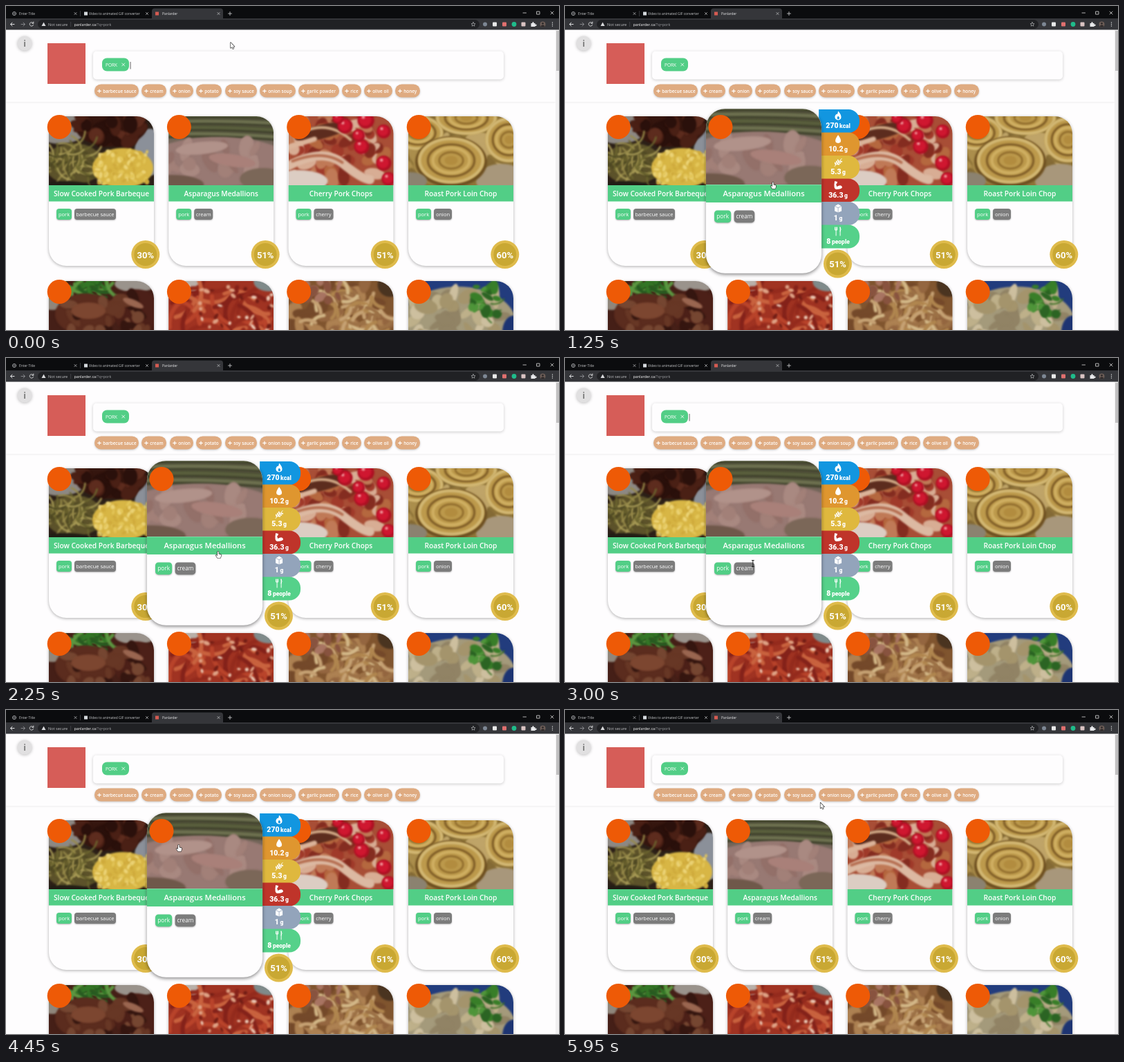
Animation, 800 px wide and 470 px high, one loop 6 s. Source, as an HTML page with a canvas:

```html
<!DOCTYPE html>
<html lang="en">
<head>
<meta charset="utf-8">
<title>Recipe search</title>
<style>
html, body { margin: 0; width: 100%; height: 100%; overflow: hidden; background: #fefdfe; }
canvas { display: block; }
</style>
</head>
<body>
<canvas id="stage" width="800" height="470"></canvas>
<script>
const LOOP = 6000, SANS = '"Open Sans", sans-serif', ROBOTO = 'Roboto, sans-serif';
const GREEN = '#52ce86', ORANGE = '#ee5a06';
const main = document.getElementById('stage').getContext('2d');
let g = main;

// ---- drawing helpers
function box(x, y, w, h, color, r = 0) {
  g.fillStyle = color;
  g.beginPath();
  g.roundRect(x, y, w, h, r);
  g.fill();
}
function oval(x, y, rx, ry, color, turn = 0) {
  g.fillStyle = color;
  g.beginPath();
  g.ellipse(x, y, rx, ry, turn, 0, 7);
  g.fill();
}
const dot = (x, y, r, color) => oval(x, y, r, r, color);
function ring(x, y, rx, ry, color, width) {
  g.strokeStyle = color;
  g.lineWidth = width;
  g.beginPath();
  g.ellipse(x, y, rx, ry, 0, 0, 7);
  g.stroke();
}
function stroke(d, color, width) {
  g.strokeStyle = color;
  g.lineWidth = width;
  g.lineCap = 'round';
  g.stroke(new Path2D(d));
}
function fill(d, color) {
  g.fillStyle = color;
  g.fill(new Path2D(d));
}
function text(s, x, y, size, color, weight = 400, align = 'left', family = SANS) {
  g.font = `${weight} ${size}px ${family}`;
  g.textAlign = align;
  g.fillStyle = color;
  g.fillText(s, x, y);
}
function shadowed(alpha, blur, dy, draw) {
  g.save();
  g.shadowColor = `rgba(0,0,0,${alpha})`;
  g.shadowBlur = blur;
  g.shadowOffsetY = dy;
  draw();
  g.restore();
}
function at(x, y, draw) {
  g.save();
  g.translate(x, y);
  draw();
  g.restore();
}

// ---- dish pictures: soft shapes, painted once
let seed = 1;
const rnd = () => (seed = seed * 16807 % 2147483647) / 2147483647;
const between = (a, b) => a + (b - a) * rnd();

function blobs(n, x, y, w, h, size, ...colors) {
  for (let i = 0; i < n; i++)
    oval(x + rnd() * w, y + rnd() * h, size * between(.6, 1.3), size * between(.35, .8),
      colors[i % colors.length], rnd() * 3);
}
function strands(n, x, y, w, h, length, width, ...colors) {
  for (let i = 0; i < n; i++) {
    const a = x + rnd() * w, b = y + rnd() * h, turn = rnd() * 6.3;
    const dx = length * Math.cos(turn), dy = length * Math.sin(turn);
    stroke(`M${a} ${b}q${dx / 2 - dy * .3} ${dy / 2 + dx * .3} ${dx} ${dy}`, colors[i % colors.length], width);
  }
}
function cherry(x, y, r) {
  dot(x, y, r, '#b01024');
  dot(x - 1, y - 1, r * .75, '#cf1730');
  dot(x - r * .3, y - r * .4, r * .2, '#f4a3a5');
}
function onion(x, y, rx, ry) {
  oval(x, y, rx, ry, '#bd9a4c');
  ring(x, y, rx * .95, ry * .95, '#d3b976', 4);
  ring(x, y, rx * .7, ry * .7, '#7c5a25', 3);
  ring(x, y, rx * .55, ry * .55, '#d0b063', 4);
  ring(x, y, rx * .36, ry * .36, '#8b6729', 2.5);
  oval(x, y, rx * .2, ry * .2, '#b28c3f');
}
function picture(start, base, paint) {
  const c = document.createElement('canvas');
  c.width = 304;
  c.height = 200;
  g = c.getContext('2d');
  g.scale(2, 2);
  g.filter = 'blur(2.5px)';
  seed = start;
  box(-9, -9, 170, 118, base);
  paint();
  g = main;
  return c;
}

const pictures = [
  picture(11, '#2c2018', () => {
    oval(16, 16, 40, 24, '#8d8883');
    oval(146, 52, 22, 34, '#8b9099');
    oval(90, 14, 52, 30, '#35160f');
    blobs(26, 45, 0, 90, 36, 13, '#4a2015', '#2a100b', '#5d2c1e');
    oval(36, 69, 42, 30, '#5c522a');
    strands(50, 0, 42, 62, 42, 25, 2.5, '#978a49', '#6c662f', '#4c4722', '#aa9d58');
    oval(107, 75, 44, 29, '#d8b645');
    blobs(80, 66, 50, 78, 48, 4, '#e4c75a', '#cfaa3c', '#ecd478');
    oval(25, 101, 34, 7, '#211d15');
  }),
  picture(22, '#74665a', () => {
    for (let i = 0; i < 4; i++) {
      stroke(`M-5 ${i * 9}Q70 ${i * 9 - 3} 157 ${i * 10 + 1}`, '#42442e', 10);
      stroke(`M-5 ${i * 9 - 1}Q70 ${i * 9 - 4} 157 ${i * 10}`, i % 2 ? '#6e7150' : '#5a5f3d', 5);
    }
    oval(72, 66, 105, 36, '#987973');
    blobs(16, 0, 44, 138, 36, 14, '#a28078', '#a98981', '#937069');
    oval(48, 46, 38, 9, '#b1928a', -.1);
    oval(92, 64, 34, 9, '#a98079', .15);
    oval(5, 99, 46, 14, '#6f584a');
    oval(137, 91, 34, 16, '#7b6758');
  }),
  picture(33, '#a84e36', () => {
    blobs(60, 0, 0, 150, 95, 12, '#c07a57', '#842c20', '#d8ad94', '#a03a2a', '#b5683f');
    oval(15, 94, 42, 16, '#dccdc3');
    oval(50, 22, 42, 10, '#5c2c1e', -.25);
    stroke('M0 72Q50 45 78 68T118 92', '#dcb9a2', 13);
    stroke('M6 65Q50 48 78 67', '#b56d50', 4);
    stroke('M25 21Q60 7 90 34', '#d2aa87', 4);
    stroke('M0 45L38 33', '#dbb49a', 7);
    [[82, 14, 11], [112, 6, 12], [106, 44, 11], [138, 68, 11], [145, 91, 10], [102, 28, 9], [72, 3, 8], [138, 22, 10]]
      .forEach(c => cherry(...c));
  }),
  picture(44, '#8f7439', () => {
    blobs(24, 0, 0, 152, 100, 20, '#ab8e4c', '#846a35', '#bfa468');
    onion(14, 24, 36, 24);
    onion(84, 2, 44, 24);
    onion(146, 34, 34, 32);
    oval(135, 93, 37, 24, '#a8977b');
    oval(62, 66, 52, 37, '#6f5122');
    onion(62, 64, 48, 33);
    oval(3, 94, 24, 13, '#8b8270');
  }),
  picture(55, '#451f17', () => {
    oval(6, 24, 30, 18, '#8f867b');
    oval(125, 4, 30, 12, '#9a938c');
    strands(22, 24, 0, 60, 14, 28, 5, '#347727', '#5c9741', '#285b21');
    oval(54, 48, 45, 30, '#5b2c1e');
    oval(127, 44, 34, 32, '#4c2018');
    blobs(28, 15, 24, 130, 58, 12, '#673725', '#351610', '#754631');
    oval(57, 43, 25, 12, '#7c4630');
    oval(122, 32, 16, 5, '#9a6650', .4);
  }),
  picture(66, '#a03322', () => {
    oval(1, 5, 45, 18, '#b9b0a9');
    strands(36, 10, 8, 135, 65, 44, 6, '#c9633f', '#84221a', '#b9442b', '#942b1d');
    blobs(34, 25, 8, 125, 65, 4, '#dfa386', '#ecccb8', '#701d15');
    oval(145, 1, 22, 14, '#7f8a8a');
  }),
  picture(77, '#80552f', () => {
    blobs(45, 0, 0, 152, 100, 16, '#946640', '#ad8152', '#74492a');
    strands(50, 35, 14, 100, 65, 22, 5, '#c6a274', '#b0864f', '#d3b888', '#9c7146');
    blobs(14, 0, 0, 80, 28, 9, '#a87462', '#88533f');
    oval(147, 5, 18, 18, '#4a3420');
  }),
  picture(88, '#223c7d', () => {
    oval(72, 62, 84, 54, '#a49a7b');
    blobs(36, 6, 18, 130, 70, 14, '#beb08a', '#918365', '#cdbf9f', '#a4946c');
    strands(8, 90, 26, 30, 20, 20, 2, '#3a7125');
    blobs(18, 88, 6, 44, 42, 8, '#387e28', '#4f953a', '#2b6423');
    oval(152, 74, 16, 24, '#1d3472');
  })
];

// ---- cards
const columns = [62, 235.2, 408.5, 582];
const dishes = [
  ['Slow Cooked Pork Barbeque', 'barbecue sauce', 60, '30%'],
  ['Asparagus Medallions', 'cream', 27, '51%'],
  ['Cherry Pork Chops', 'cherry', 28, '51%'],
  ['Roast Pork Loin Chop', 'onion', 26, '60%']
];

function tag(s, x, w, color) {
  shadowed(.3, 2, 1, () => box(x, 134, w, 16, color, 4));
  text(s, x + w / 2, 144.6, 7.5, '#fff', 400, 'center');
}
function cardBody(i, lift = 0) {
  const [name, extra, width] = dishes[i % 4];
  shadowed(.32 + lift * .13, 4 + lift, 1 + lift, () => box(0, 0, 152, 217, '#fefdfe', 25));
  g.save();
  g.beginPath();
  g.roundRect(0, 0, 152, 217, 25);
  g.clip();
  g.drawImage(pictures[i], 0, 0, 152, 100);
  box(0, 100, 152, 23.5, GREEN);
  g.restore();
  text(name, 76, 115.5, 10.2, '#fff', 600, 'center');
  tag('pork', 11, 22, GREEN);
  tag(extra, 37, width, '#7c7c7c');
}
function badge(x, y, label) {
  dot(x, y, 20.5, '#dfbb4b');
  dot(x, y, 16.5, '#c9a833');
  text(label, x, y + 5, 13, '#fff', 700, 'center', ROBOTO);
}
function card(i) {
  const x = columns[i % 4], y = i < 4 ? 160 : 399;
  at(x, y, () => cardBody(i));
  dot(x + 15.2, y + 15.5, 17.5, ORANGE);
  if (i < 4) badge(x + 139.8, 360.5, dishes[i][3]);
}

// ---- nutrition panel
const icons = [
  () => { fill('M0-7Q6-1 4 4Q0 8-4 4Q-6 0-2-3Q-1-1 0-7Z', '#fff'); fill('M0 0Q4 4 0 5Q-3 4 0 0Z', '#1296e0'); },
  () => fill('M0-6Q8 5 0 6Q-8 5 0-6Z', '#fff'),
  () => {
    stroke('M-5 6L5-5', '#fff', 1);
    for (let k = -2; k < 4; k += 2) {
      oval(k - 2, -k, 2.2, .9, '#fff', 1.3);
      oval(k + 2, 1 - k, 2.2, .9, '#fff', .2);
    }
  },
  () => fill('M-5-6L-1-5L-2-2L-3-2L-2 2Q5-2 6 3Q5 6-3 6Q-7 5-5-6Z', '#fff'),
  () => { fill('M0-6L5-3V4L0 6L-5 4V-3Z', '#fff'); stroke('M-5-3L0-1L5-3M0-1V6', '#93a4bb', .8); },
  () => stroke('M-3-6V6M-4.5-6V-2H-1.5V-6M3-6V6M3-6Q5-3 3 0', '#fff', 1)
];
const facts = [
  ['#1296e0', '270', 'kcal'], ['#df962f', '10.2', 'g'], ['#dfb83e', '5.3', 'g'],
  ['#bf342a', '36.3', 'g'], ['#93a4bb', '1', 'g'], ['#55d18a', '8', 'people']
];
function panel(x) {
  facts.forEach(([color, value, unit], i) => at(x, 150 + i * 33.5, () => {
    box(-4, 0, 59, 34, color, [0, 16, 16, 0]);
    at(24, 9.5, icons[i]);
    g.font = `900 10.5px ${ROBOTO}`;
    const a = g.measureText(value).width + 1.5;
    g.font = `900 8.5px ${ROBOTO}`;
    const left = 24 - (a + g.measureText(unit).width) / 2;
    text(value, left, 27, 10.5, '#fff', 900, 'left', ROBOTO);
    text(unit, left + a, 27, 8.5, '#fff', 900, 'left', ROBOTO);
  }));
}
function liftedCard(p) {
  const cx = 311.2 - 23.7 * p, s = 1 + .1 * p;
  const out = Math.max(0, (p - .4) / .6);
  if (out) panel(cx + 76 * s - 55 * (1 - out));
  at(cx, 268.5, () => {
    g.scale(s, s);
    g.translate(-76, -108.5);
    cardBody(1, p);
  });
  dot(250.4 - 25.4 * p, 175.5, 17.5, ORANGE);
  badge(375.2 + 19.3 * p, 360.5 + 13.5 * p, '51%');
}

// ---- browser window
function cross(x, y, r, color, width = .8) {
  stroke(`M${x - r} ${y - r}l${2 * r} ${2 * r}m0 ${-2 * r}l${-2 * r} ${2 * r}`, color, width);
}
function browser() {
  box(0, 0, 800, 18, '#0b0c0e');
  box(0, 18, 800, 16.4, '#35363a');
  box(211, 3.5, 103, 16, '#35363a', [4, 4, 0, 0]);
  ring(12, 11, 2.6, 2.6, '#9b9da0', .9);
  stroke('M9.5 11H14.5M12 8.5V13.5', '#9b9da0', .6);
  text('Enter Title', 19, 13, 4.9, '#c8c9cb');
  box(113, 8.5, 5, 5, '#d5d9dd');
  text('Video to animated GIF converter', 120, 13, 4.9, '#c8c9cb');
  box(197, 5, 4, 12, '#0b0c0e');
  box(216, 8.5, 5, 5, '#d55b52');
  text('Panlarder', 226, 13, 4.9, '#e8e8ea');
  [100.5, 204, 307.5].forEach(x => cross(x, 11, 1.6, '#c5c6c8', .7));
  box(107, 7, .6, 8, '#55565a');
  stroke('M321.5 11h5m-2.5-2.5v5', '#d5d6d8', .8);
  stroke('M748 10h4.5M768 8h4v4h-4z', '#ddd', .8);
  cross(790, 10, 2, '#ddd');

  box(46, 20, 639, 13, '#202124', 6.5);
  stroke('M12 26.5H7M9 24l-2.5 2.5L9 29', '#e0e1e3', 1);
  stroke('M22 26.5h5M25 24l2.5 2.5L25 29', '#85868a', 1);
  stroke('M39.5 25a2.8 2.8 0 1 0 .1 2.5M39.8 23v2.2h-2.2', '#e0e1e3', .9);
  fill('M54.5 23.5l3 5.5h-6z', '#d8d9db');
  text('Not secure', 61, 28.6, 5.6, '#c3c4c7');
  box(93.5, 23, .6, 7, '#55565a');
  text('panlarder.ca', 98.5, 28.6, 5.4, '#fff');
  const end = g.measureText('panlarder.ca').width;
  text('/?q=pork', 98.5 + end, 28.6, 5.4, '#9fa1a5');
  stroke('M676 23.5l.9 2 2.1.2-1.6 1.4.5 2.1-1.9-1.1-1.9 1.1.5-2.1-1.6-1.4 2.1-.2z', '#c8c9cb', .6);
  dot(693, 26.5, 3, '#7d8794');
  box(704, 23.5, 6, 6, '#e9e9e9', 1);
  box(718, 23.5, 6, 6, '#e0706f', 1);
  dot(735, 26.5, 3.4, '#1fbc8b');
  box(745.5, 23.5, 6, 6, '#d9c3c2', 1);
  fill('M759.5 25h2a1.2 1.2 0 1 1 2 0h2v2a1.2 1.2 0 1 1 0 1.5v1.5h-6z', '#e8e9eb');
  dot(776.5, 26.5, 4, '#6b5c56');
  dot(776.5, 25.3, 1.4, '#2e2a2a');
  oval(776.5, 29, 2.5, 1.5, '#2e2a2a');
  [24, 26.5, 29].forEach(y => dot(790.5, y, .7, '#e0e1e3'));
}

// ---- page header
const pills = [
  [128, 64, 'barbecue sauce'], [196, 36, 'cream'], [237, 34, 'onion'], [275, 37, 'potato'], [317, 46, 'soy sauce'],
  [367, 52, 'onion soup'], [423, 59, 'garlic powder'], [486, 28, 'rice'], [518, 41, 'olive oil'], [563, 36, 'honey']
];
function header(caret) {
  shadowed(.09, 3, .5, () => box(0, 34, 795, 105, '#fefdfe'));
  shadowed(.25, 4, 1, () => dot(27, 54, 10.5, '#e1e0e1'));
  text('i', 27, 58.5, 12, '#7a7a7a', 700, 'center');
  box(60, 54, 55, 59, '#d65d58');
  shadowed(.2, 4, 1, () => box(126, 65.5, 594, 41, '#fefdfe', 5));
  box(139, 75.5, 39, 19, GREEN, 7);
  text('PORK', 144, 87.6, 6.5, '#fff');
  cross(169.7, 85, 2, '#fff');
  if (caret) box(179.6, 81, .9, 10.5, '#555');
  for (const [x, w, s] of pills) {
    shadowed(.22, 3, 1, () => box(x, 113.5, w, 19, '#dfab81', 9.5));
    stroke(`M${x + 4.7} 123.3h4.6m-2.3-2.3v4.6`, '#fff', 1.2);
    text(s, x + 12.2, 125.6, 6.4, '#fff', 600);
  }
}
function scrollbar() {
  box(795, 34, 5, 436, '#f1f0f1');
  box(796, 36, 4, 58, '#c1c0c1');
}

// ---- pointer: time, x, y
const path = [
  [0, 325, 53], [150, 325, 53], [700, 313, 164], [1250, 300, 256], [1650, 300, 258], [2250, 306, 281],
  [2400, 306, 281], [3300, 260, 304], [3700, 259, 305], [4450, 249, 196],
  [5180, 335, 148], [5300, 347, 135], [5950, 369.5, 134.5]
];
function pointerAt(t) {
  const i = path.findIndex(k => k[0] > t);
  if (i < 0) return path.at(-1).slice(1);
  const [a, b] = [path[i - 1], path[i]];
  const u = (t - a[0]) / (b[0] - a[0]), e = u * u * (3 - 2 * u);
  return [a[1] + (b[1] - a[1]) * e, a[2] + (b[2] - a[2]) * e];
}
function pointer(t, over) {
  const [x, y] = pointerAt(t);
  const onText = over && y > 297 && y < 314 && x > 244 && x < 274;
  const shape = !over ? 'M0 0V8L1.9 6.3L3.2 9.2L4.4 8.7L3.1 5.9H5.6Z'
    : 'M0 0Q1-1 1.6 0V3.2L5 4.2Q5.6 6 4.3 9H-.2L-2.5 5.2Q-1.7 4.3 0 6Z';
  at(x, y, () => {
    if (onText) return stroke('M-1.5-4.5h3M0-4.5v9M-1.5 4.5h3', '#111', .9);
    g.lineJoin = 'round';
    stroke(shape, '#222', 1.2);
    fill(shape, '#fff');
  });
}

// ---- timeline
const HOVER_IN = 690, HOVER_OUT = 5180;
const ease = u => 1 - (1 - Math.min(1, Math.max(0, u))) ** 2;

function draw(now) {
  const t = now % LOOP;
  const p = ease((t - HOVER_IN) / 300) - ease((t - HOVER_OUT) / 300);
  box(0, 0, 800, 470, '#fefdfe');
  header((t - 656 + 1060) % 1060 < 530);
  for (let i = 0; i < 8; i++) if (i !== 1) card(i);
  liftedCard(p);
  scrollbar();
  browser();
  pointer(t, t >= HOVER_IN && t < HOVER_OUT);
}
const start = performance.now();
function tick() {
  draw(performance.now() - start);
  requestAnimationFrame(tick);
}
tick();
</script>
</body>
</html>
```
